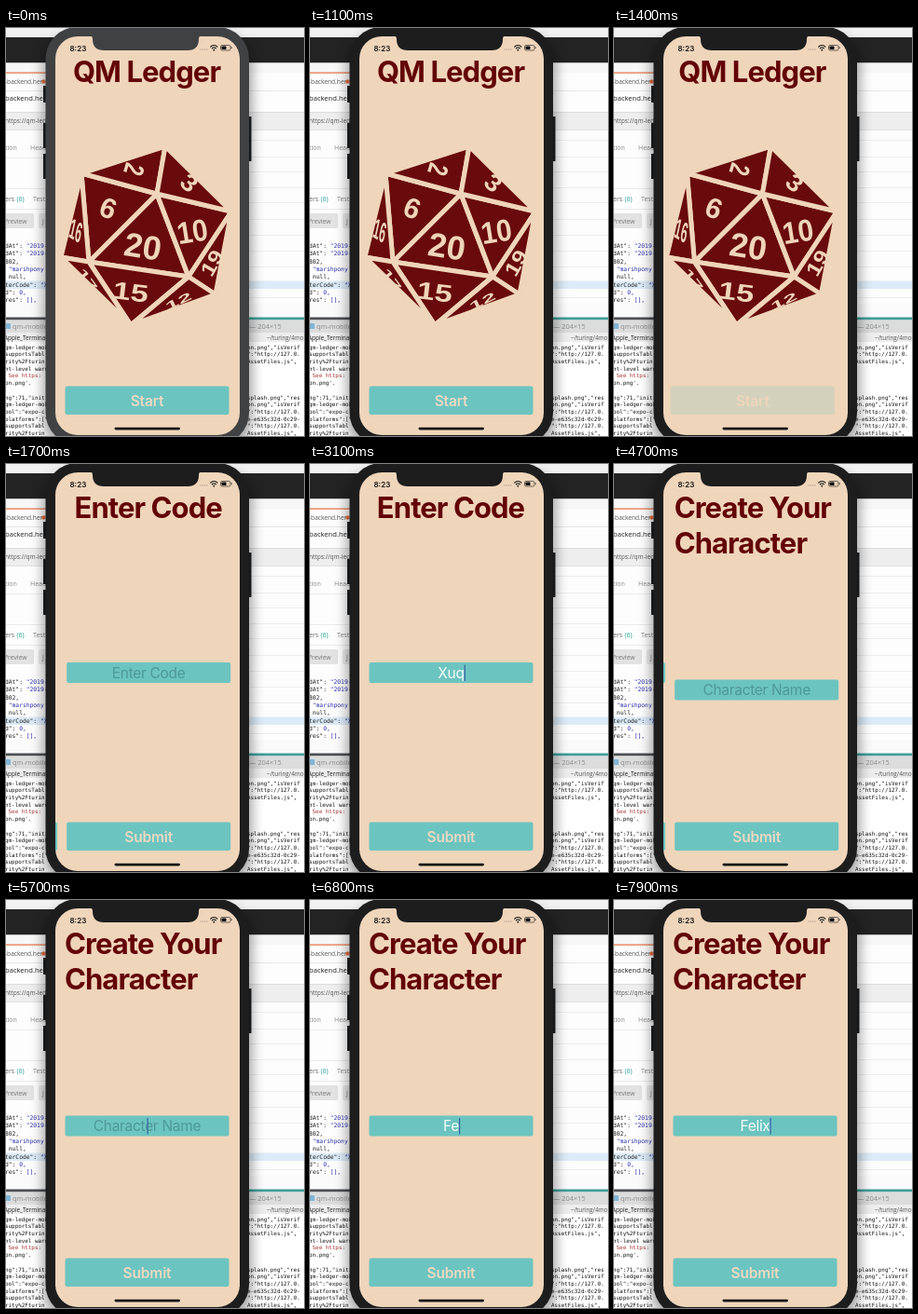
Recreate the animation shown at these times as an HTML page. Size 320 by 438 pixels, loop 8000 ms.

```html
<!DOCTYPE html>
<html lang="en">
<head>
<meta charset="utf-8">
<title>Phone demo</title>
<style>
html, body { margin: 0; width: 100%; height: 100%; overflow: hidden; background: #fff; }
svg { display: block; width: 100%; height: 100%; font-family: Inter, sans-serif; }
text { white-space: pre; }
.title { font-size: 31px; font-weight: 700; letter-spacing: -.03em; fill: #630307; }
.label { font-size: 15.5px; font-weight: 600; letter-spacing: -.01em; fill: #efd8c0; text-anchor: middle; }
.field { font-size: 15.5px; letter-spacing: -.02em; text-anchor: middle; }
.mid { text-anchor: middle; }
.num { font: 700 30px "Liberation Sans", Arial, sans-serif; fill: #efd5ba; text-anchor: middle; }
.mono { font-family: "DejaVu Sans Mono", monospace; }
.ui { font-family: "Open Sans", sans-serif; }
</style>
</head>
<body>
<svg viewBox="0 0 320 438" preserveAspectRatio="none">
  <defs>
    <clipPath id="screen"><rect x="53" y="9" width="198" height="428" rx="24"/></clipPath>
    <filter id="blur" x="-20%" y="-20%" width="140%" height="140%"><feGaussianBlur stdDeviation="7"/></filter>
  </defs>
  <g id="desk"></g>
  <rect x="40" y="8" width="224" height="446" rx="34" opacity=".38" filter="url(#blur)"/>
  <path d="M40 62h4v18h-4zM40 102h4v27h-4zM40 135h4v27h-4zM260 95h3.500v48h-3.500z" fill="#17181a"/>
  <rect class="bezel" x="42.500" y="-1" width="218.500" height="448" rx="34"/>
  <rect x="53" y="9" width="198" height="428" rx="24" fill="#efd5ba"/>
  <g clip-path="url(#screen)">
    <g id="home"></g>
    <g id="code"></g>
    <g id="hero"></g>
  </g>
  <path class="bezel" d="M89 8q4 0 4 4q0 12 12 12h90q12 0 12-12q0-4 4-4z"/>
  <g fill="#111">
    <text x="68.500" y="24.500" font-size="8" font-weight="600">8:23</text>
    <path d="M208.500 22.500h1v1h-1zm2.300 0h1v1h-1zm2.300 0h1v1h-1zm2.300 0h1v1h-1z" opacity=".4"/>
    <path d="M219.300 20.300q4-3.600 8 0M220.900 22q2.400-2 4.800 0" fill="none" stroke="#111" stroke-width="1.100"/>
    <circle cx="223.300" cy="23.700" r=".9"/>
    <rect x="230.500" y="18.500" width="10.500" height="5.500" rx="1.500" fill="none" stroke="#111" stroke-width=".6"/>
    <rect x="231.500" y="19.500" width="5" height="3.500" rx=".7"/>
    <rect x="241.700" y="20.200" width=".8" height="2" rx=".4"/>
    <rect x="116.500" y="428.700" width="70.500" height="2.800" rx="1.400"/>
  </g>
</svg>
<script>
const LOOP = 8000, TEAL = '#6cc4c0', RED = '#690a0c', SAND = '#efd5ba';
const ENTER = 198, LEAVE = 186, FOCUS = 1100;
const $ = id => document.getElementById(id);
const esc = s => s.replace(/&/g, '&amp;').replace(/</g, '&lt;');
const rect = (x, y, w, h, fill, extra = '') =>
  `<rect x="${x}" y="${y}" width="${w}" height="${h}" fill="${fill}" ${extra}/>`;
const text = (x, y, s, cls, size, fill, extra = '') =>
  `<text x="${x}" y="${y}" class="${cls}"${size ? ` font-size="${size}"` : ''}${fill ? ` fill="${fill}"` : ''} ${extra}>${esc(s)}</text>`;

// Desktop windows behind the phone
function desk() {
  let s = rect(0, 0, 320, 438, '#fdfdfd') + rect(0, 0, 320, 10, '#f1f1f1')
    + rect(0, 10, 320, 27.5, '#232324') + rect(0, 37.5, 320, 11, '#f7f7f7');
  s += rect(0, 47.5, 43, 1.2, '#e8713c') + rect(0, 67, 320, .7, '#dedede')
    + text(-1, 60, '-backend.her', 'ui', 6.6, '#555') + '<circle cx="40.5" cy="57.500" r="2.200" fill="#e8713c"/>'
    + text(-1, 78, 'backend.her', 'ui', 7.6, '#222')
    + rect(0, 90, 320, 19, '#eee') + rect(0, 90, 320, .7, '#d6d6d6') + rect(0, 109, 320, .7, '#d6d6d6')
    + text(-1, 102, 'https://qm-led', 'ui', 6.6, '#555')
    + text(-1, 131, 'tion', 'ui', 7, '#888') + text(26, 131, 'Head', 'ui', 7, '#888')
    + text(-1, 186, 'ers', 'ui', 7, '#666') + text(11.5, 186, '(6)', 'ui', 7, '#2aa198')
    + text(29, 186, 'Test', 'ui', 7, '#888')
    + rect(-3, 199, 33, 16, '#e2e2e2', 'rx="2"') + rect(35, 199, 12, 16, '#e8e8e8', 'rx="2"')
    + text(-2, 209.5, 'Preview', 'ui', 6.8, '#777') + text(39, 209.5, 'J', 'ui', 6.8, '#777');
  [120, 138, 154, 171, 187, 205, 222, 239, 256, 289].forEach(y => s += rect(261, y, 59, .7, '#e7e7e7'));
  [139, 172, 194].forEach(y => s += rect(0, y, 43, .7, '#e4e4e4'));
  s += rect(0, 271.5, 320, 8.5, '#dcebf7');
  const json = [['dAt": ', '"2019-'], ['dAt": ', '"2019-'], ['802,', ''], [' ', '"marshpony'],
    [' null,', ''], ['terCode": ', '"X'], ['d": ', '0,'], ['res": ', '[],']];
  json.forEach(([key, val], i) => {
    const y = 236 + i * 8.3;
    s += text(-1, y, key, 'mono', 6.3, '#222') + text(-1 + key.length * 3.79, y, val, 'mono', 6.3, '#2b2fae');
  });
  s += rect(0, 296, 320, 14, '#fafafa') + rect(0, 310.5, 43, 3, '#4a4f52') + rect(261, 310.5, 59, 3, '#3f9d98')
    + rect(0, 313.5, 320, 14, '#dcdcdc') + rect(0, 327, 320, 10, '#ededed') + rect(0, 337, 320, 101, '#fff')
    + '<rect x="-1" y="317" width="6" height="6" rx="1" fill="#7fb6d8"/>'
    + text(7, 323, 'qm-mobile', 'ui', 7.4, '#8a8a8a') + text(261, 323, '— 204×15', 'ui', 7.4, '#8a8a8a')
    + text(-2, 334.5, 'Apple_Terminal', 'ui', 6.4, '#222') + text(280, 334.5, '~/turing/4mo', 'ui', 6.4, '#555');
  const log = [
    ['qm-ledger-mobil', 'on.png","isVerif'], ['supportsTabl', '":"http://127.0.'], ['rity%2Fturin', 'AssetFiles.js",'],
    ['nt-level warn', ''], [' See https:', ''], ["on.png'.", ''], ['', ''],
    ['ng":71,"initi', 'splash.png","res'], ['qm-ledger-mob', 'on.png","isVerif'], ['ool":"expo-c', '":"http://127.0.'],
    ['platforms":["i', 'e-e635c32d-0c29-'], ['supportsTabl', '":"http://127.0.'], ['rity%2Fturin', 'AssetFiles.js",']];
  log.forEach(([a, b], i) => {
    const y = 344.5 + i * 7.72;
    s += text(-1, y, a, 'mono', 5.9, i === 4 ? '#a33' : '#111') + text(259, y, b, 'mono', 5.9, '#111');
  });
  return s;
}

// Twenty-sided die from the outer ring and the three front corners
function die() {
  const v = { T: [171, 127], A: [81, 156], L: [59, 246], B: [134, 319], F: [225, 286], E: [242, 197],
    P: [162, 178], Q: [89, 251], R: [196, 267] };
  const faces = 'PQR APQ PRE QRB ATP TPE AQL LQB ERF RBF'.split(' ');
  const nums = [['20', 147, 234, 'rotate(9) scale(1.2)'], ['6', 110, 193, 'rotate(21) scale(1.02)'],
    ['10', 200, 218, 'rotate(-9) scale(1 1.1)'], ['15', 134, 283, 'rotate(7) scale(1.15 .88)'],
    ['2', 138, 152, 'rotate(106) scale(.72 1)'], ['3', 197, 166, 'rotate(42) scale(.95 .85)'],
    ['16', 75, 217, 'rotate(12) skewY(20) scale(.42 1)'], ['17', 88, 270, 'rotate(54) scale(.8 .4)'],
    ['19', 221, 252, 'rotate(-60) scale(.85 .72)'], ['12', 185, 293, 'rotate(-26) scale(.9 .4)']];
  return faces.map(f => `<polygon points="${[...f].map(k => v[k]).join(' ')}" fill="${RED}" stroke="${SAND}" stroke-width="5"/>`).join('')
    + nums.map(([n, x, y, m]) => `<text class="num" transform="translate(${x} ${y}) ${m}" y="10.800">${n}</text>`).join('');
}

const button = s => `<g class="btn">${rect(63.5, 384.5, 176, 30.5, TEAL, 'rx="2"')}${text(151.5, 405.5, s, 'label')}</g>`;
const field = (y, hint) => rect(63.5, y, 176, 22, TEAL, 'rx="2"')
  + text(151.5, y + 16.5, hint, 'field hint', 0, '#4d9996')
  + text(151.5, y + 16.5, '', 'field typed', 0, '#f6fbfa')
  + rect(0, y + 2.5, 1.2, 17.5, '#3b61a8', 'class="caret"');

$('desk').innerHTML = desk();
$('home').innerHTML = text(151, 58, 'QM Ledger', 'title mid') + die() + button('Start');
$('code').innerHTML = text(151, 58, 'Enter Code', 'title mid') + field(213, 'Enter Code') + button('Submit');
$('hero').innerHTML = text(63, 58, 'Create Your', 'title') + text(63, 96, 'Character', 'title')
  + field(231.5, 'Character Name') + button('Submit');

const bezels = document.querySelectorAll('.bezel');
const pages = ['home', 'code', 'hero'].map($);
const inputs = [
  { page: $('code'), word: 'Xuq7iG', keys: [2600, 2800, 3100, 3300, 3600, 3800], focus: 2200, blur: 3950 },
  { page: $('hero'), word: 'Felix', keys: [6500, 6700, 6900, 7000, 7100], focus: 5400, blur: 9000 }];
const presses = [
  { btn: $('home').querySelector('.btn'), down: 1150, up: 1385 },
  { btn: $('code').querySelector('.btn'), down: 4045, up: 4385 }];

const clamp = x => Math.max(0, Math.min(1, x));
const inOut = x => x < .5 ? 2 * x * x : 1 - 2 * (1 - x) * (1 - x);

// Critically damped spring from 0 to 1
function slide(t, start) {
  const w = Math.max(0, t - start) * .0222;
  const p = 1 - (1 + w) * Math.exp(-w);
  return p > .998 ? 1 : p;
}

function type(t, { page, word, keys, focus, blur }) {
  const n = keys.filter(k => k <= t).length;
  const typed = page.querySelector('.typed'), caret = page.querySelector('.caret');
  typed.textContent = word.slice(0, n);
  page.querySelector('.hint').style.display = n ? 'none' : '';
  const since = t - (n ? keys[n - 1] : focus);
  const on = t >= focus && t < blur && since % 800 < 400;
  caret.style.display = on ? '' : 'none';
  if (on) caret.setAttribute('x', 151.5 + (n ? typed.getComputedTextLength() / 2 : 0));
}

function draw(t) {
  // The window's frame darkens once it has focus
  bezels.forEach(b => b.setAttribute('fill', t < FOCUS ? '#404143' : '#1d1d1e'));
  const pos = slide(t, 1393) + slide(t, 4393);
  pages.forEach((page, i) => {
    const d = i - pos;
    page.setAttribute('transform', `translate(${d * (d > 0 ? ENTER : LEAVE)} 0)`);
    page.style.display = Math.abs(d) < 1 ? '' : 'none';
  });
  presses.forEach(({ btn, down, up }) => {
    const dim = inOut(clamp((t - down) / 150)) - inOut(clamp((t - up) / 250));
    btn.setAttribute('opacity', 1 - .8 * dim);
  });
  inputs.forEach(input => type(t, input));
}

const begin = performance.now();
function tick() {
  draw((performance.now() - begin) % LOOP);
  requestAnimationFrame(tick);
}
tick();
</script>
</body>
</html>
```
